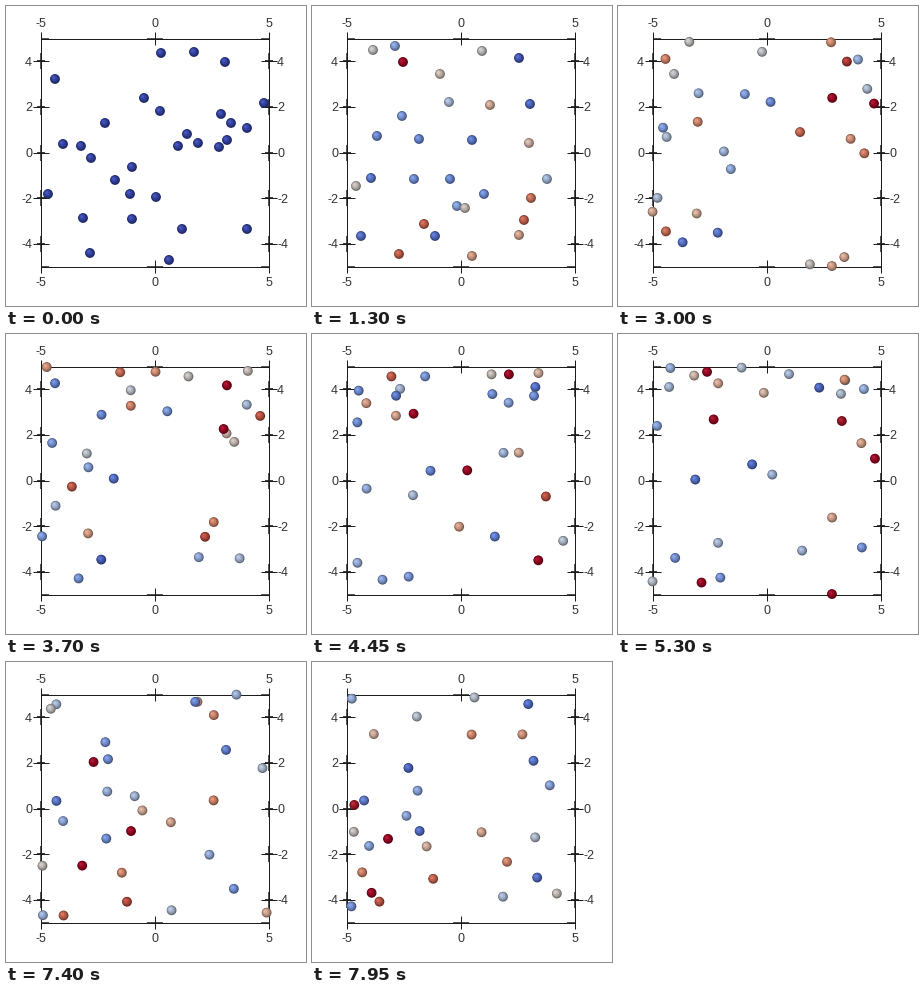
Recreate the animation shown at these times as a matplotlib script. Size 300 by 300 pixels, loop 8 s.

```python
import numpy as np
import matplotlib.pyplot as plt
from matplotlib.animation import FuncAnimation

SIZE, FRAMES, STEP = 300, 160, 50
LEFT, RIGHT, TOP, BOTTOM = 34.5, 262.5, 32.5, 260.5
LOW, HIGH = np.array([LEFT, TOP]), np.array([RIGHT, BOTTOM])
PT = 0.72           # points per pixel at 100 dpi
FAST = 130.0        # speed in px/s at the hot end of the colour map
RAMP = 26           # frames of the first spreading phase
INK = "#1c1c1c"

# resting positions
START = np.array([
    (219, 56), (258, 97), (126, 213), (77, 212), (42, 188), (172, 140),
    (75, 140), (85, 152), (126, 161), (109, 174), (221, 134), (138, 92),
    (49, 73), (150, 191), (241, 122), (192, 137), (99, 117), (155, 47),
    (154, 105), (57, 138), (163, 254), (225, 117), (181, 128), (241, 223),
    (176, 223), (215, 108), (213, 141), (84, 247), (124, 188), (188, 46)], float)

# positions after the spreading phase, with relative speed
SPREAD = np.array([
    (207, 52, .06), (218, 98, .1), (123, 230, .12), (49, 230, .12),
    (59, 172, .15), (160, 134, .15), (65, 130, .2), (107, 133, .2),
    (138, 173, .2), (102, 173, .22), (172, 188, .22), (90, 110, .25),
    (83, 40, .28), (145, 200, .28), (235, 173, .38), (137, 96, .4),
    (61, 44, .5), (170, 45, .5), (128, 68, .55), (44, 180, .53),
    (153, 202, .53), (217, 137, .58), (178, 99, .62), (207, 229, .65),
    (160, 250, .68), (219, 192, .8), (212, 214, .84), (112, 218, .84),
    (87, 248, .85), (91, 56, 1)], float)


def fold(pos):
    """Reflect positions back into the box."""
    span = HIGH - LOW
    q = np.mod(pos - LOW, 2 * span)
    return LOW + np.minimum(q, 2 * span - q)


def repulsion(pos):
    gap = pos[:, None] - pos[None]
    r2 = (gap ** 2).sum(2)[..., None]
    return (gap * (200 / (r2 + 36) + 3e5 / (r2 + 64) ** 2)).sum(1)


def bounce(pos, vel):
    out = (pos < LOW) | (pos > HIGH)
    return fold(pos), np.where(out, -vel, vel)


def simulate():
    track, heat = [], []
    end = SPREAD[:, :2]
    move = end - START
    vel = move / np.linalg.norm(move, axis=1)[:, None] * SPREAD[:, 2:] * FAST
    total = RAMP * STEP / 1000

    # from rest to the spread positions
    for i in range(RAMP + 1):
        u = i / RAMP
        pos = START + move * (3 * u**2 - 2 * u**3) + total * vel * (u**3 - u**2)
        now = move * (6 * u - 6 * u**2) / total + vel * (3 * u**2 - 2 * u)
        track.append(fold(pos))
        heat.append(np.linalg.norm(now, axis=1) / FAST)

    # free flight with mutual repulsion
    pos, sub = end.copy(), 4
    dt = STEP / 1000 / sub
    for _ in range(RAMP + 1, FRAMES):
        for _ in range(sub):
            vel = vel + repulsion(pos) * dt
            pos, vel = bounce(pos + vel * dt, vel)
        rms = np.sqrt((vel ** 2).sum(1).mean())
        vel = vel * (1 + 0.06 * (0.6 * FAST / rms - 1))
        track.append(pos.copy())
        heat.append(np.linalg.norm(vel, axis=1) / FAST)
    return track, heat


track, heat = simulate()

fig = plt.figure(figsize=(SIZE / 100, SIZE / 100), dpi=100, facecolor="white")
ax = fig.add_axes([0, 0, 1, 1])
ax.set_xlim(0, SIZE)
ax.set_ylim(SIZE, 0)
ax.axis("off")


def line(x0, y0, x1, y1, width=1.0):
    ax.plot([x0, x1], [y0, y1], color=INK, lw=width * PT,
            solid_capstyle="butt", zorder=1)


def label(x, y, value, align):
    ax.text(x, y, str(value), ha=align, va="center_baseline", color="#333333",
            family="Liberation Sans", fontsize=12.5 * PT, zorder=1)


for x in (LEFT, RIGHT):
    line(x, TOP, x, BOTTOM)
for y in (TOP, BOTTOM):
    line(LEFT, y, RIGHT, y)

for value in (-5, 0, 5):
    x = 148.5 + 22.8 * value
    for y, text_y in ((TOP, 16.5), (BOTTOM, 275)):
        line(x, y - 6.5, x, y + 6.5)
        line(max(x - 8, LEFT), y, min(x + 8, RIGHT), y, 1.5)
        label(x, text_y, value, "center")

for value in (-4, -2, 0, 2, 4):
    y = 146.5 - 22.8 * value
    for x, text_x, align in ((LEFT, 26, "right"), (RIGHT, 271, "left")):
        line(x - 8, y, x + 8, y)
        line(x - 4, y, x + 4, y, 1.7)
        line(x, y - 8, x, y + 8, 1.5)
        label(text_x, y, value, align)

# each ball is a stack of discs: radius, shift, brightness, white share
LAYERS = [(4.9, 0.0, 0.48, 0.0), (4.2, -0.35, 0.68, 0.0),
          (3.1, -0.8, 0.82, 0.02), (1.7, -1.3, 0.92, 0.08)]
COUNT = len(START)
radii = np.tile([layer[0] for layer in LAYERS], COUNT)
shifts = np.tile([layer[1] for layer in LAYERS], COUNT)[:, None]
bright = np.tile([layer[2] for layer in LAYERS], COUNT)[:, None]
white = np.tile([layer[3] for layer in LAYERS], COUNT)[:, None]
balls = ax.scatter(np.zeros(len(radii)), np.zeros(len(radii)),
                   s=(2 * radii * PT) ** 2, linewidths=0, zorder=3)
cmap = plt.get_cmap("coolwarm")


def draw(i):
    spots = np.repeat(track[i], len(LAYERS), axis=0)
    base = np.repeat(cmap(np.clip(heat[i], 0, 1))[:, :3], len(LAYERS), axis=0)
    balls.set_offsets(spots + shifts)
    balls.set_facecolors(base * bright * (1 - white) + white)
    return balls,


anim = FuncAnimation(fig, draw, frames=FRAMES, interval=STEP,
                     repeat=True, repeat_delay=0, blit=False)
plt.show()
```
